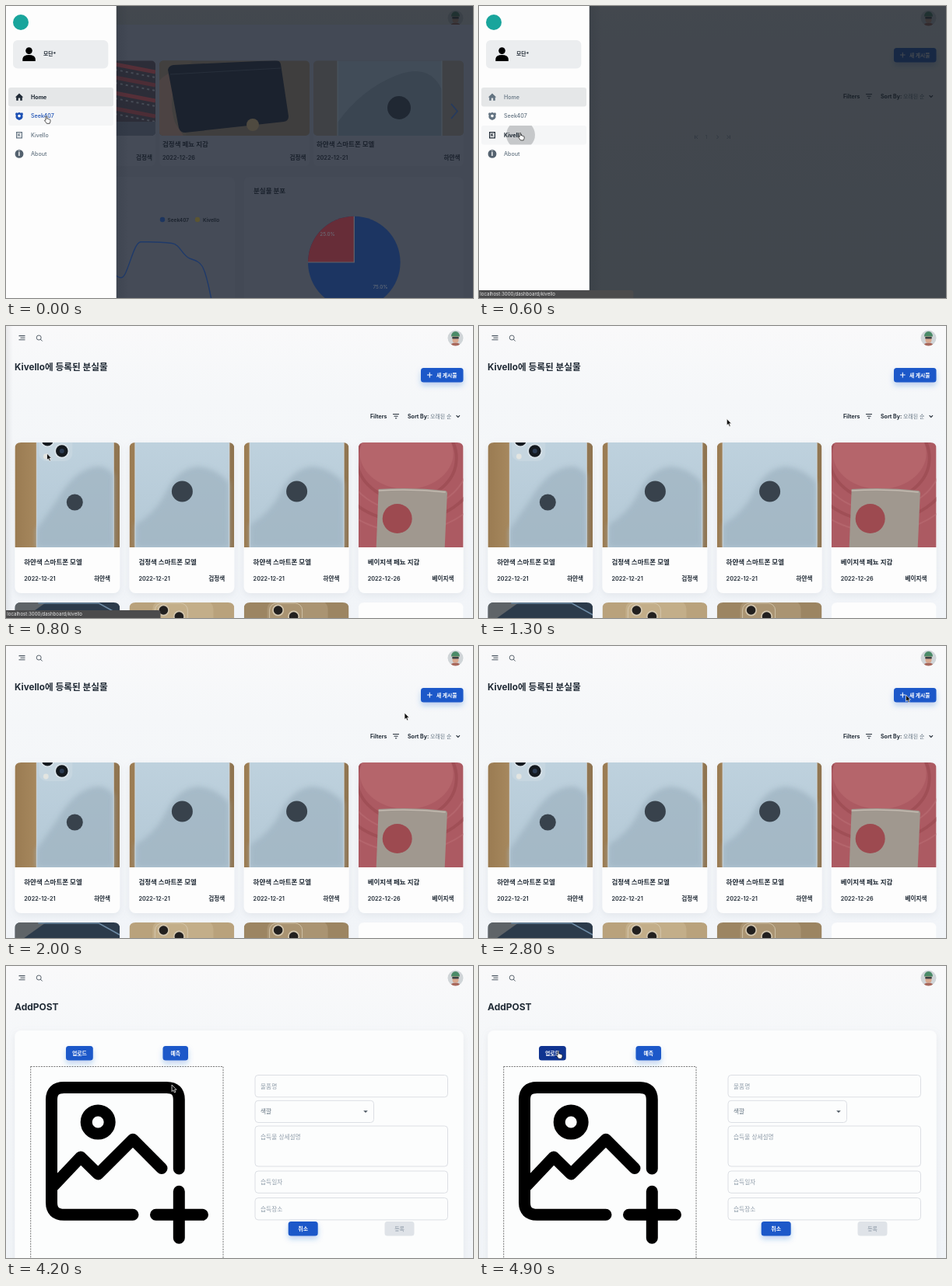
Write an HTML page that moves like this. It is 600 by 376 pixels and loops after 5000 ms.

```html
<!DOCTYPE html>
<html lang="ko">
<head>
<meta charset="utf-8">
<title>Lost and found dashboard</title>
<style>
html, body { margin: 0; width: 100%; height: 100%; overflow: hidden; background: #f4f6f9; }
svg { display: block; width: 600px; height: 376px; font-family: Inter, 'Noto Sans CJK KR', 'Noto Sans CJK', sans-serif; }
</style>
</head>
<body>
<svg id="stage" viewBox="0 0 600 376"></svg>
<script>
const BLUE = '#1d59c9', DEEP = '#103490', INK = '#212b36', GREY = '#637381';
const LOOP = 5000, STEP = 100;

const text = (x, y, s, size = 7.1, fill = INK, weight = 400, anchor = 'start', extra = '') =>
  `<text x="${x}" y="${y}" font-size="${size}" fill="${fill}" font-weight="${weight}" text-anchor="${anchor}" ${extra}>${s}</text>`;
const rect = (x, y, w, h, fill, r = 0, extra = '') =>
  `<rect x="${x}" y="${y}" width="${w}" height="${h}" rx="${r}" fill="${fill}" ${extra}/>`;
const dot = (x, y, r, fill, extra = '') => `<circle cx="${x}" cy="${y}" r="${r}" fill="${fill}" ${extra}/>`;
const shape = (d, fill, extra = '') => `<path d="${d}" fill="${fill}" ${extra}/>`;
const line = (d, color, w = 1, extra = '') =>
  `<path d="${d}" fill="none" stroke="${color}" stroke-width="${w}" ${extra}/>`;
const group = (id, body, extra = '') => `<g id="${id}" ${extra}>${body}</g>`;
const clip = (id, x, y, w, h, r) => `<clipPath id="${id}">${rect(x, y, w, h, '#000', r)}</clipPath>`;
const round = 'stroke-linecap="round" stroke-linejoin="round"';

const button = (x, y, w, h, label, id = '') =>
  rect(x, y, w, h, BLUE, 3.5, `filter="url(#glow)" ${id && `id="${id}"`}`) +
  text(x + w / 2, y + h / 2 + 2.5, label, 6.9, '#fff', 700, 'middle');

const defs = `<defs>
  <linearGradient id="page" x2="0" y2="1"><stop stop-color="#f9f9fa"/><stop offset=".25" stop-color="#f5f7f9"/><stop offset="1" stop-color="#f1f4f8"/></linearGradient>
  <linearGradient id="edge"><stop stop-color="#1a222d" stop-opacity=".14"/><stop offset="1" stop-color="#1a222d" stop-opacity="0"/></linearGradient>
  <linearGradient id="wood"><stop stop-color="#9a7b52"/><stop offset=".3" stop-color="#ac8e63"/><stop offset="1" stop-color="#8f7450"/></linearGradient>
  <linearGradient id="glass" x2="0" y2="1"><stop stop-color="#bfd2de"/><stop offset="1" stop-color="#b2c7d5"/></linearGradient>
  <filter id="glow" x="-30%" y="-30%" width="160%" height="200%"><feDropShadow dx="0" dy="4" stdDeviation="3.5" flood-color="#2065d1" flood-opacity=".28"/></filter>
  <filter id="soft" x="-10%" y="-10%" width="120%" height="125%"><feDropShadow dx="0" dy="3" stdDeviation="4" flood-color="#919eab" flood-opacity=".16"/></filter>
  <filter id="blur"><feGaussianBlur stdDeviation="3"/></filter>
  ${clip('face', 567.5, 5.5, 20, 20, 10)}${clip('row', 3, 154, 135, 24.5, 3)}
</defs>`;

const header =
  line('M16.5 12.6H24.5M18.5 15.2H24.5M16.5 17.8H24.5', '#4a5560', 1.1) +
  line('M44.6 17.4L46.4 19.2', '#4a5560', 1, round) +
  `<circle cx="42.2" cy="15" r="3" fill="none" stroke="#4a5560" stroke-width=".9"/>` +
  `<g clip-path="url(#face)">${rect(567, 5, 21, 21, '#d0d5d8')}` +
  shape('M570 27Q571 21.5 577.5 21.5T585 27Z', '#a9685c') + rect(573.5, 11, 8, 10.5, '#d9a88e', 3.5) +
  shape('M572 13.5Q572.5 7 577.5 7T583 13.5Z', '#4a8a68') + rect(573.2, 14, 8.6, 2.4, '#3a4145', 1) + '</g>';

const listHead =
  text(11, 57, 'Kivello에 등록된 분실물', 11.7, INK, 700) +
  rect(533, 54, 54.5, 18.5, BLUE, 3.5, 'id="newBtn" filter="url(#glow)"') +
  `<g id="newLabel" fill="#fff">` +
  `<path d="M541 62.6H547.6V63.6H541ZM543.8 59.8H544.8V66.4H543.8Z"/>` +
  `<text x="553" y="65.7" font-size="6.8" font-weight="700">새 게시물</text></g>` +
  text(468, 118.8, 'Filters', 7, INK, 700) +
  line('M497 113.6H505M498.5 116.2H503.6M500 118.8H502.2', INK, 1) +
  text(516, 118.8, 'Sort By:', 7, INK, 700) + text(545, 118.8, '오래된 순', 6.9, GREY) +
  line('M578.6 115.2L580.8 117.4L583 115.2', INK, 1.2);

const pager = line('M277.5 166.5V171M281 166.5L278.8 168.8L281 171M318.6 166.5L320.8 168.8L318.6 171M322.3 166.5V171M305.5 166.5L307.6 168.8L305.5 171', '#919eab', .9) +
  text(292, 171, '1', 6, '#919eab', 400, 'middle');

// Each picture is drawn in a 135 x 135 box.
const nearPhone = rect(0, 0, 135, 135, 'url(#wood)') + rect(28, -10, 99, 160, 'url(#glass)') +
  shape('M28 112Q48 84 62 62Q84 30 110 31Q122 34 127 42V135H28Z', '#9fb3c1', 'filter="url(#blur)" opacity=".75"') +
  line('M28 0V135M127 0V135', '#d5dee4', .8) +
  rect(31, -20, 43, 44, '#c6d6e0', 10) +
  dot(60.5, 11, 9.5, '#dbe4ea') + dot(60.5, 11, 7.8, '#14191f') + dot(60.5, 11, 3, '#2c3b52') +
  dot(42, -3, 9, '#dbe4ea') + dot(42, -3, 7.5, '#14191f') + dot(40, 18, 3.4, '#e3e5e1') +
  dot(77, 77, 10.5, '#38424c');
const farPhone = rect(0, 0, 135, 135, 'url(#wood)') + rect(7.5, -10, 121, 160, 'url(#glass)') +
  shape('M8 106Q34 90 46 66Q62 33 88 31Q112 33 128 52V135H8Z', '#9fb3c1', 'filter="url(#blur)" opacity=".75"') +
  line('M7.5 0V135M128.5 0V135', '#d5dee4', .9) + dot(68, 63, 13.5, '#38424c');
const redWallet = rect(0, 0, 135, 135, '#ac5a62') +
  [64, 80, 96, 112].map((r, i) => `<ellipse cx="62" cy="20" rx="${r}" ry="${r * .85}" fill="none" stroke="${i % 2 ? '#b96d73' : '#98484f'}" stroke-width="${i % 2 ? 2 : 4}" opacity=".6"/>`).join('') +
  `<ellipse cx="62" cy="14" rx="60" ry="46" fill="#b5656b"/>` +
  shape('M26 60Q70 57 112 62Q115 63 114 68L111 135H23Z', '#a0988f') +
  line('M26 62Q70 59 112 64', '#c3bab0', 1.5) + dot(50, 98, 19, '#9d4a50');

const beige = (back, body) => rect(0, 0, 135, 40, back) + rect(30, -2, 78, 50, body, 10) +
  rect(33, 1, 42, 40, body, 9, 'stroke="#d9ccb3" stroke-width=".8"') +
  dot(44, 10, 7.5, '#d3c6ae') + dot(44, 10, 5.8, '#22201f') + dot(64, 18, 7.5, '#d3c6ae') + dot(64, 18, 5.8, '#22201f');
const lowerRow = [
  rect(0, 0, 135, 40, '#2c3b4b') + shape('M0 0H40L12 20H0Z', '#5f6468') + line('M30 1H108L135 16', '#6e8ba5', 1.5),
  beige('#b9a27c', '#c3ae89'),
  beige('#9c8562', '#aa9472'),
  rect(0, 0, 135, 40, '#fdfdfd')
];

const items = [
  [11.3, nearPhone, '하얀색 스마트폰 모엘', '2022-12-21', '하얀색'],
  [158.4, farPhone, '검정색 스마트폰 모엘', '2022-12-21', '검정색'],
  [305.6, farPhone, '하얀색 스마트폰 모엘', '2022-12-21', '하얀색'],
  [452.7, redWallet, '베이지색 페뇨 지갑', '2022-12-26', '베이지색']
];
const cards = `<defs><clipPath id="pic"><path d="M0 135V8Q0 0 8 0H127Q135 0 135 8V135Z"/></clipPath></defs>` +
  items.map(([x, pic, title, date, color], i) => `<g transform="translate(${x} 150)">` +
    rect(0, 0, 135, 194, '#fdfdfd', 8, 'filter="url(#soft)"') +
    `<g clip-path="url(#pic)">${pic}</g>` + text(12, 157, title, 8.5, INK, 700) +
    text(12, 178, date, 7.3, INK, 600) + text(122.8, 178, color, 7.6, INK, 600, 'end') +
    `<g transform="translate(0 206)" clip-path="url(#pic)">${lowerRow[i]}</g></g>`).join('');

const field = (y, h, label, w = 247.5, fill = '#919eab') =>
  rect(320, y, w, h, 'none', 4, 'stroke="#d8dce1" stroke-width=".9"') + text(327, y + 17, label, 7.7, fill);
const addPage =
  text(11, 57, 'AddPOST', 12, INK, 700) +
  rect(11.3, 83, 576.5, 320, '#fcfdfd', 8, 'filter="url(#soft)"') +
  button(77, 103, 34.8, 18.4, '업로드', 'upload') + button(201.5, 103, 32.5, 18.4, '예측') +
  rect(31.7, 129.5, 247.3, 270, 'none', 0, 'stroke="#555" stroke-width=".8" stroke-dasharray="2 1.3"') +
  line('M222.3 261V172Q222.3 156.5 206.5 156.5H74.5Q58.5 156.5 58.5 172V304.5Q58.5 320.3 74.5 320.3H163M61 283L96 246L118.3 268L163 223.3L200 260.5M192.5 320.3H252.5M222.3 290.3V350.3', '#000', 15, round) +
  `<circle cx="118.2" cy="201" r="15" fill="none" stroke="#000" stroke-width="15"/>` +
  field(140.5, 28.3, '물품명') + field(173.3, 28.2, '색깔', 152.5, GREY) + field(206, 52, '습득물 상세설명') +
  field(264, 28.3, '습득일자') + field(298.6, 28.3, '습득장소') +
  shape('M459.2 186.2H464.8L462 189Z', '#4a5560') +
  button(362.7, 329, 38, 18.5, '취소') + rect(486.5, 329, 38, 18.5, '#dfe3e8', 3.5) +
  text(505.5, 340.8, '등록', 6.9, '#a3adb8', 700, 'middle');

// The first page is only ever seen behind the dark backdrop.
const DIM = '#1b222d', PANEL = '#454b57';
const homePage =
  rect(142, 24, 458, 352, '#434955') +
  [[0, 192], [197, 390], [395, 588]].map(([a, b]) => rect(a, 70.5, b - a, 136, PANEL, 6)).join('') +
  clip('h1', 100, 70.5, 92, 96.5, 5) + clip('h2', 197, 70.5, 193, 96.5, 5) + clip('h3', 395, 70.5, 193, 96.5, 5) +
  `<g clip-path="url(#h1)">${rect(100, 70, 92, 97, '#2c2d38')}` +
  [80, 97, 117, 137].map((y, i) => line(`M140 ${y - 5}L192 ${y + 5}`, i % 2 ? '#4c2d36' : '#562f38', 5) +
    line(`M140 ${y + 2}L192 ${y + 12}`, '#464b55', 2, 'stroke-dasharray="3 4"')).join('') +
  rect(140, 149, 52, 18, '#343b48') + '</g>' +
  `<g clip-path="url(#h2)">${rect(197, 70, 193, 97, '#3f3e3e')}` +
  shape('M197 70H240L212 110L232 167H197Z', '#42403f') + shape('M197 96Q214 78 222 94Q207 118 217 150L228 167H197Z', '#4c4343') +
  shape('M208 82Q209 77 215 76L346 70Q352 70 353 75L363 142Q363 148 357 149L230 163Q224 163 222 157Z', '#1b222e') +
  line('M211 88L353 80', '#272f3b', 1) + dot(317, 153, 8, '#4f4a40') + '</g>' +
  `<g clip-path="url(#h3)">${rect(395, 70, 193, 97, '#3f4145')}` + rect(426, 60, 134, 120, '#414c58') +
  shape('M426 150Q456 108 500 90T560 108V170H426Z', '#3a4551') + line('M426 70V167M560 70V167', '#4d5661', 1) + dot(505, 131, 15, '#202833') + '</g>' +
  line('M572 126L580 135.5L572 145', '#253a60', 1.6) +
  text(188, 198, '검정색', 7.6, DIM, 600, 'end') +
  text(201, 181, '검정색 페뇨 지갑', 8.5, DIM, 700) + text(201, 198, '2022-12-26', 7.3, DIM, 600) + text(385.5, 198, '검정색', 7.6, DIM, 600, 'end') +
  text(399, 181, '하얀색 스마트폰 모엘', 8.5, DIM, 700) + text(399, 198, '2022-12-21', 7.3, DIM, 600) + text(583.5, 198, '하얀색', 7.6, DIM, 600, 'end') +
  rect(100, 220, 194, 170, PANEL, 7) + rect(305.5, 220, 282.5, 170, PANEL, 7) +
  text(318, 240.5, '분실물 분포', 8.5, DIM, 700) +
  dot(201, 275, 3.2, '#1d355f') + text(207.5, 277.6, 'Seek407', 6.5, DIM, 600) +
  dot(246, 275, 3.2, '#5b5532') + text(253, 277.6, 'Kivello', 6.5, DIM, 600) +
  line('M141 347C147 351 150 351 153 345C160 331 165 305 173 303.8C185 303.5 202 304 213 305.5C224 307 226 321 236 325C245 328 249 330 252 335C258 345 261 365 264 378', '#1f3a6a', 1.4) +
  dot(447.3, 330, 59.3, '#1c3562') + shape('M447.3 330H388A59.3 59.3 0 0 1 447.3 270.7Z', '#672d38') +
  line('M388 330H447.3V270.7', '#5f646d', 1.2) +
  text(413, 296.3, '25.0%', 6.4, '#6b717b', 400, 'middle') + text(481, 364.3, '75.0%', 6.4, '#6b717b', 400, 'middle');

const icons = [
  'M11.8 117.4L17 112.6L22.2 117.4H20.8V121.8H18.2V118.6H15.8V121.8H13.2V117.4Z',
  'M13 137.3Q15 138.4 17 136.8Q19 138.4 21 137.3L22 139Q20.8 141 21.6 143Q21 145.8 17 147Q13 145.8 12.4 143Q13.2 141 12 139Z'
];
const navText = (i, label) => text(32, 119.8 + i * 24.4, label, 7.1, GREY, 400, 'start', `id="nav${i}"`);
const drawer =
  rect(-20, 0, 161.8, 376, '#fdfdfd') + rect(141.8, 0, 16, 376, 'url(#edge)') +
  dot(19, 21, 10, '#19a59c') + rect(9, 44, 122.3, 36.5, '#ebedef', 6) +
  dot(29.5, 57.6, 4.3, '#000') + shape('M21.3 71V68Q22 63 29.5 63T37.8 68V71Z', '#000') +
  text(48, 64.4, '모단*', 6.8, INK, 700) +
  rect(3, 105, 135, 24.5, '#e5e7e8', 3) + rect(3, 129.6, 135, 24.4, '#f5f6f7', 3, 'id="hover"') +
  `<g clip-path="url(#row)">${dot(53.5, 166, 18.5, '#c6c8ca', 'id="ripple"')}</g>` +
  shape(icons[0], GREY, 'id="icon0"') + shape(icons[1], GREY, 'id="icon1"') + dot(17, 141.6, 1.8, '#fdfdfd') +
  `<g id="icon2" fill="${GREY}"><path fill-rule="evenodd" d="M13 162H21V170.4H13ZM14.2 163.2V169.2H19.8V163.2Z"/><text x="17" y="168.1" font-size="5.2" font-weight="800" text-anchor="middle">K</text></g>` +
  dot(17, 190.4, 5.4, '#54626f') + text(17, 193.4, 'i', 8, '#fff', 800, 'middle') +
  ['Home', 'Seek407', 'Kivello', 'About'].map((s, i) => navText(i, s)).join('');

const status = shape('M0 366H195Q198.5 366 198.5 369V376H0Z', '#4b4b4c') +
  text(1.3, 373, 'localhost:3000/dashboard/kivello', 6.1, '#e8e8e8');
const arrow = shape('M0 0V8.6L2 6.9L3.4 10L4.9 9.3L3.5 6.3H6.1Z', '#111', 'stroke="#fff" stroke-width=".7"');
const hand = shape('M1.2 1Q2.4 -.2 3.2 1V4.2Q4.4 3.6 5 4.6Q6.2 4.2 6.6 5.2Q8 5 8 6.4V8.2Q7.4 9.6 7 11H2.8Q1.6 9 -.4 6.8Q0 5.4 1.4 6.4Z', '#fff', 'stroke="#111" stroke-width=".8" transform="translate(-1.2 -.6) scale(.9)"');

const $ = id => document.getElementById(id);
$('stage').innerHTML = defs + rect(0, 0, 600, 376, 'url(#page)') + header +
  group('list', listHead + group('pager', pager) + group('cards', cards)) + group('add', addPage) +
  rect(0, 0, 600, 376, '#161c24', 0, 'id="dim"') + group('home', homePage) +
  group('drawer', drawer) + group('status', status) + group('arrow', arrow) + group('hand', hand);

const show = (id, on) => { $(id).style.display = on ? '' : 'none'; };
const paint = (id, fill, weight) => {
  $(id).setAttribute('fill', fill);
  if (weight) $(id).setAttribute('font-weight', weight);
};
// A hovered button darkens and loses its shadow.
const heat = (id, hot) => {
  paint(id, hot ? DEEP : BLUE);
  $(id).setAttribute('filter', hot ? 'none' : 'url(#glow)');
};

// time, x, y of the pointer tip
const pointer = [
  [0, 51, 142], [100, 51, 144], [300, 51.5, 163], [800, 52.5, 164], [900, 60, 164], [1600, 512, 86],
  [2000, 512, 86], [2900, 553, 60], [3600, 553, 60], [3800, 470, 78], [4000, 470, 78],
  [4200, 213, 153], [4400, 90, 95], [4500, 42, 56], [4700, 78, 92], [4900, 101, 110], [LOOP, 101, 110]
];
function pointAt(t) {
  const i = pointer.findIndex(p => p[0] > t);
  const [a, x0, y0] = pointer[i - 1], [b, x1, y1] = pointer[i];
  const k = (t - a) / (b - a);
  return [x0 + (x1 - x0) * k, y0 + (y1 - y0) * k];
}

function draw(t) {
  const onHome = t < 600, onList = t >= 600 && t < 3600, row = t < 200 ? 1 : 2;
  show('home', onHome);
  show('list', onList);
  show('add', t >= 3600);
  show('pager', t < 700);
  show('cards', t >= 700);

  const closing = t < 700 ? 0 : t < 800 ? .6 : 1;
  $('dim').setAttribute('opacity', .8 * (1 - closing));
  $('drawer').setAttribute('transform', `translate(${-149 * closing} 0)`);
  show('drawer', t < 900);
  $('hover').setAttribute('y', row === 1 ? 129.6 : 154);
  show('ripple', t >= 500);
  $('ripple').setAttribute('r', t < 600 ? 9 : 18.5);
  const active = onHome ? 0 : 2;
  for (let i = 0; i < 4; i++) {
    const fill = i === active ? INK : onHome && i === row ? '#1c50b4' : GREY;
    paint('nav' + i, fill, i === active ? 700 : 500);
    if (i < 3) paint('icon' + i, fill);
  }
  show('status', t >= 300 && t < 1300);

  const hot = t >= 2900;
  heat('newBtn', hot);
  paint('newLabel', hot ? '#1f51b5' : '#fff');
  heat('upload', t >= 4700);

  const useHand = t < 800 || t >= 4700, [x, y] = pointAt(t);
  show('hand', useHand);
  show('arrow', !useHand);
  $(useHand ? 'hand' : 'arrow').setAttribute('transform', `translate(${x} ${y})`);
}

const start = performance.now();
function tick() {
  const t = (performance.now() - start) % LOOP;
  draw(Math.floor(t / STEP) * STEP);
  requestAnimationFrame(tick);
}
tick();
</script>
</body>
</html>
```
